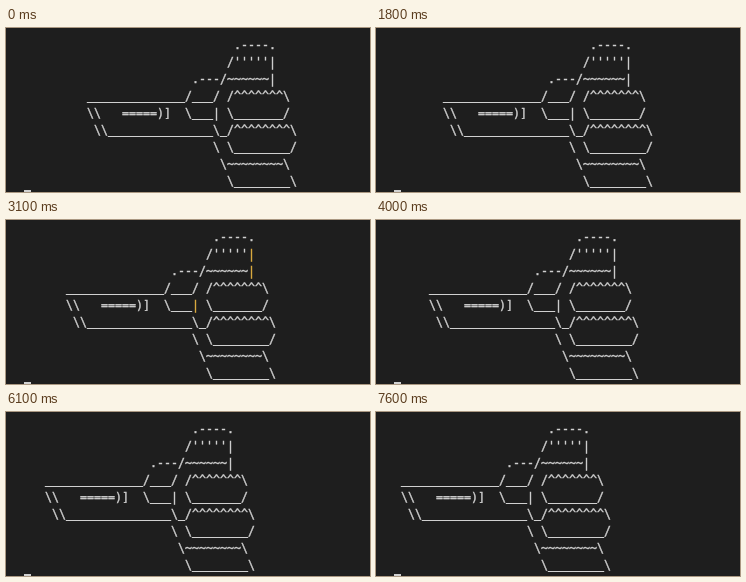
Animation, 364 px wide and 164 px high, one loop 8 s. Source, as an HTML page:

```html
<!DOCTYPE html>
<html lang="en">
<head>
<meta charset="utf-8">
<title>ASCII art sliding left</title>
<style>
  html, body {
    margin: 0;
    width: 100%;
    height: 100%;
    overflow: hidden;
    background: #1e1e1e;
  }
  pre {
    position: absolute;
    left: 81px;
    top: 9px;
    margin: 0;
    font: 11.63px/17px "DejaVu Sans Mono", monospace;
    color: #d0d0d0;
    -webkit-text-stroke: .4px;
    animation: slide 8s step-end infinite;
  }
  i {
    font-style: normal;
    animation: tint 8s step-end infinite;
  }
  .cursor {
    position: absolute;
    left: 18px;
    top: 162px;
    width: 7px;
    height: 2px;
    background: #d0d0d0;
  }
  /* one 7px character cell about every second */
  @keyframes slide {
    0%     { transform: translateX(0); }
    2.5%   { transform: translateX(-7px); }
    15%    { transform: translateX(-14px); }
    27.5%  { transform: translateX(-21px); }
    40%    { transform: translateX(-28px); }
    52.5%  { transform: translateX(-35px); }
    66.25% { transform: translateX(-42px); }
    78.75% { transform: translateX(-49px); }
    91.25%, 100% { transform: translateX(-56px); }
  }
  /* the bars turn amber on every other cell */
  @keyframes tint {
    0%, 15%, 40%, 66.25%, 91.25%, 100% { color: #d0d0d0; }
    2.5%, 27.5% { color: #dcac40; }
    52.5%, 78.75% { color: #d0b070; }
  }
</style>
</head>
<body>
<pre>
                     .----.
                    /'''''<i>|</i>
               .---/~~~~~~<i>|</i>
______________/___/ /^^^^^^^\
\\   =====)]  \___<i>|</i> \_______/
 \\_______________\_/^^^^^^^^\
                  \ \________/
                   \~~~~~~~~\
                    \________\
</pre>
<div class="cursor"></div>
</body>
</html>
```
